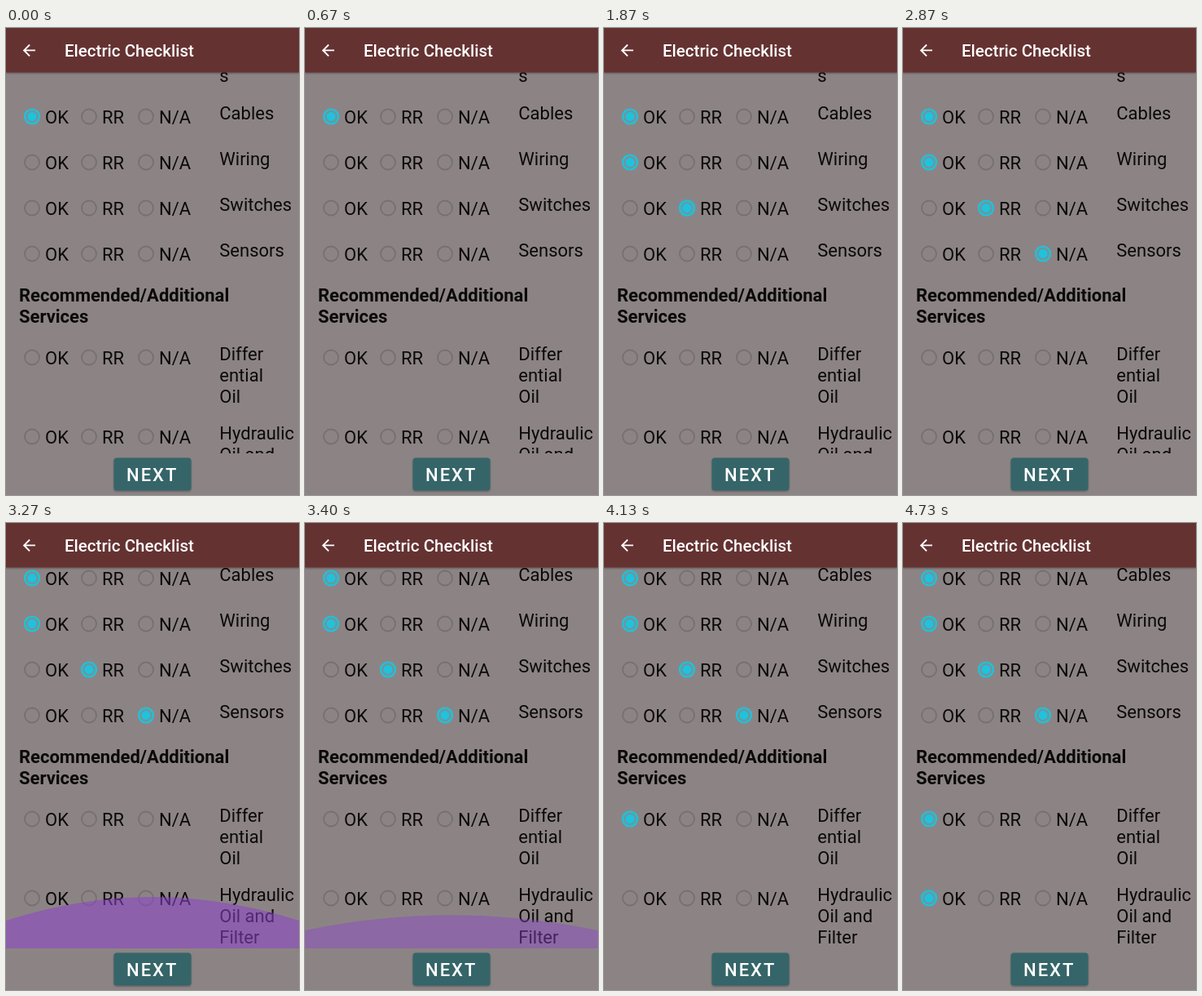
Animation, 360 px wide and 572 px high, one loop 4790 ms. Source, as an HTML page:

```html
<!DOCTYPE html>
<html>
<head>
<meta charset="utf-8">
<style>
html, body { margin: 0; width: 100%; height: 100%; overflow: hidden; background: #8c8484; }
svg { display: block; width: 360px; height: 572px; font: 22px Roboto, sans-serif; fill: #0b0909; }
.bold { font-weight: 700; }
.title { font-size: 20.5px; font-weight: 500; fill: #fff; }
.next { font-weight: 500; letter-spacing: 2px; fill: #fff; }
</style>
</head>
<body>
<svg viewBox="0 0 360 572">
  <defs>
    <clipPath id="view"><rect y="54" width="360" height="467"/></clipPath>
    <filter id="shade" x="-10%" y="-20%" width="120%" height="150%">
      <feDropShadow dx="0" dy="1" stdDeviation="1.2" flood-opacity=".35"/>
    </filter>
  </defs>
  <rect width="360" height="572" fill="#8c8484"/>
  <g clip-path="url(#view)">
    <g id="list">
      <text x="262.3" y="66">s</text>
      <text class="bold" x="16" y="335">Recommended/Additional</text>
      <text class="bold" x="16" y="361">Services</text>
    </g>
    <path id="glow" d="M0 521V487Q180 429 360 487V521Z" fill="#8c44cb"/>
  </g>
  <rect width="360" height="54.5" fill="#653131" filter="url(#shade)"/>
  <path transform="translate(17 16) scale(.95)" fill="#fff" d="M20 11H7.83l5.59-5.59L12 4l-8 8 8 8 1.41-1.41L7.83 13H20v-2z"/>
  <text class="title" x="72" y="35">Electric Checklist</text>
  <rect x="132.5" y="526.5" width="95" height="40" rx="3.5" fill="#356567" filter="url(#shade)"/>
  <text class="next" x="148" y="555">NEXT</text>
</svg>
<script>
const LOOP = 4790, SCROLL_AT = 3270, SCROLL_BY = 41;
const GREY = '#777070', CYAN = '#20c2dc';
const list = document.getElementById('list'), glow = document.getElementById('glow');

// label lines, radio centre, chosen option, time of the tap
const rows = [
  [['Cables'], 108.5, 0, -400],
  [['Wiring'], 164.5, 0, 870],
  [['Switches'], 220.5, 1, 1670],
  [['Sensors'], 276.5, 2, 2470],
  [['Differ', 'ential', 'Oil'], 403.5, 0, 3870],
  [['Hydraulic', 'Oil and', 'Filter'], 500.5, 0, 4450]
];

function add(tag, attrs, text = '') {
  const el = document.createElementNS('http://www.w3.org/2000/svg', tag);
  for (const k in attrs) el.setAttribute(k, attrs[k]);
  el.textContent = text;
  return list.appendChild(el);
}

const taps = rows.map(([lines, cy, pick, at]) => {
  lines.forEach((s, i) => add('text', { x: 262.3, y: cy + 3.5 + i * 26 }, s));
  let tap;
  ['OK', 'RR', 'N/A'].forEach((s, i) => {
    const cx = 32 + i * 70;
    const ring = add('circle', { cx, cy, r: 9, fill: CYAN, 'fill-opacity': 0, stroke: GREY, 'stroke-width': 1.8 });
    add('text', { x: cx + 16, y: cy + 8.5 }, s);
    if (i === pick) {
      tap = {
        at, ring,
        dot: add('circle', { cx, cy, r: 0, fill: CYAN }),
        halo: add('circle', { cx, cy, r: 12, fill: CYAN })
      };
    }
  });
  return tap;
});

const clamp = v => Math.max(0, Math.min(1, v));

function draw(t) {
  for (const { at, ring, dot, halo } of taps) {
    const on = t >= at;
    ring.setAttribute('stroke', on ? CYAN : GREY);
    ring.setAttribute('stroke-width', on ? 2.2 : 1.8);
    ring.setAttribute('fill-opacity', on ? 0.3 : 0);
    dot.setAttribute('r', 5.4 * clamp((t - at) / 150));
    halo.setAttribute('opacity', on ? 0.25 * clamp(1 - (t - at) / 400) : 0);
  }
  const scrolled = t >= SCROLL_AT;
  list.setAttribute('transform', `translate(0 ${scrolled ? -SCROLL_BY : 0})`);
  const left = scrolled ? clamp(1 - (t - SCROLL_AT) / 660) : 0;
  glow.setAttribute('transform', `translate(0 521) scale(1 ${left * left}) translate(0 -521)`);
  glow.setAttribute('opacity', 0.55 * left);
}

let start;
function frame(now) {
  start ??= now;
  draw((now - start) % LOOP);
  requestAnimationFrame(frame);
}
draw(0);
requestAnimationFrame(frame);
</script>
</body>
</html>
```
